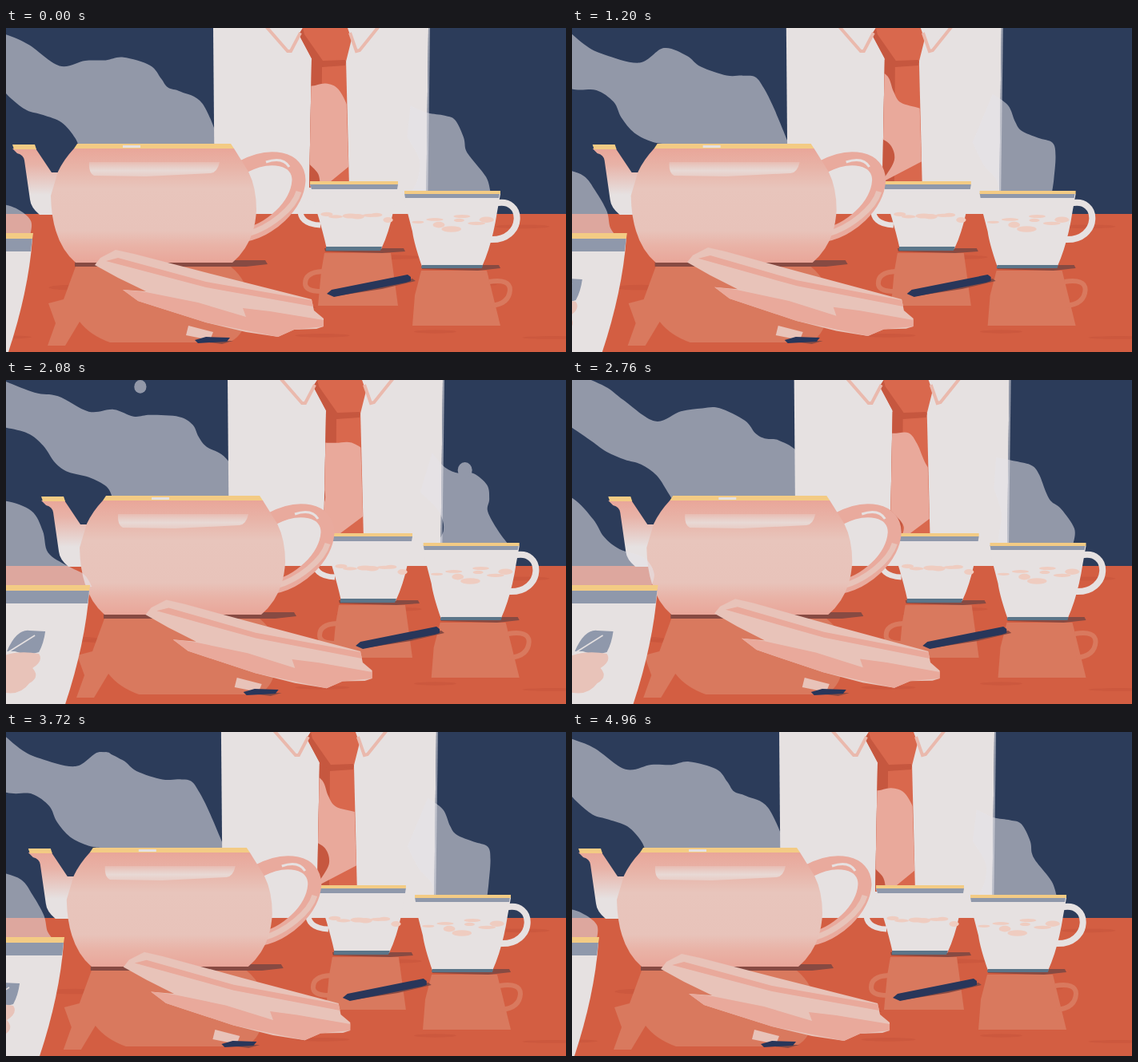
These frames come from a looping animation (700 by 406 pixels, 5000 ms). An HTML page:

```html
<!DOCTYPE html>
<html lang="en">
<head>
<meta charset="utf-8">
<title>Tea table</title>
<style>
  html, body { margin: 0; height: 100%; overflow: hidden; background: #2c3c5a; }
  svg { display: block; width: 100vw; height: 100vh; }
  .white { fill: #e6e1e1; }
  .gold { fill: #f3cb84; }
  .band { fill: #8f98ab; }
  .tie { fill: #d9684d; }
  .dark { fill: #c6573f; }
  .pink { fill: #e9a99b; }
  .cream { fill: #e8c3b9; }
  .petal { fill: #efccc0; }
  .ink { fill: #28365a; }
  .base { fill: #5b7589; }
  .shadow { fill: #874a42; }
  .mirror { fill: #d9795e; }
  .line { fill: none; }
  .steam { fill: #e6e4ea; opacity: .55; }
  .streak { fill: #c9563c; opacity: .7; }
</style>
</head>
<body>
<svg viewBox="0 0 700 406" preserveAspectRatio="none">
  <defs>
    <linearGradient id="pot" x2="0" y2="1">
      <stop offset="0" stop-color="#e9a699"/><stop offset=".16" stop-color="#e8b3a7"/>
      <stop offset=".35" stop-color="#e8c5bc"/><stop offset=".72" stop-color="#e8c3ba"/>
      <stop offset=".85" stop-color="#e9b3a7"/><stop offset="1" stop-color="#e9a699"/>
    </linearGradient>
    <linearGradient id="spout" x2="0" y2="1">
      <stop offset="0" stop-color="#e9a699"/><stop offset=".25" stop-color="#e8b3a8"/>
      <stop offset=".7" stop-color="#e6e1e1"/>
    </linearGradient>
    <linearGradient id="shine" x2="0" y2="1">
      <stop offset="0" stop-color="#e8d9d5" stop-opacity=".3"/>
      <stop offset=".6" stop-color="#e8d9d5"/><stop offset="1" stop-color="#e8d9d5" stop-opacity=".6"/>
    </linearGradient>
    <clipPath id="tieShape"><path d="M371 0H432V14L424 42 429 200H379L382 40 366 8Z"/></clipPath>
  </defs>

  <rect width="700" height="406" fill="#2c3c5a"/>
  <g data-shift="38" class="steam" id="potSteam"><path/></g>

  <g data-shift="19">
    <path class="white" d="M259 0H528L525 236H261Z"/>
    <path class="line" stroke="#959bab" stroke-width="2" d="M529 0L526 234"/>
    <path class="tie" d="M382 40H425L429 200H379Z"/>
    <path class="dark" d="M382 38L395 47 394 200H379ZM394 45L425 42 424 47 395 49Z"/>
    <path class="tie" d="M371 0H427L432 14 425 42 395 44 383 40 366 8Z"/>
    <path class="dark" d="M371 0L366 8 383 40 395 48 425 43 424 40 396 41 373 8Z"/>
    <path class="line" stroke="#eab9ad" stroke-width="4" d="M325-2L352 29H356L368 6M430 6L438 29 442 28 466-2"/>
  </g>
  <g data-shift="25" class="steam" id="cupSteam"><path/></g>
  <g data-shift="19" class="pink" clip-path="url(#tieShape)" id="tieSteam"><path/></g>

  <rect y="233" width="700" height="173" fill="#d35e42"/>
  <g id="table"></g>

  <g data-shift="19" id="farCup">
    <path class="mirror" d="M398 282H481L490 348H390L394 305Z"/>
    <path class="line" stroke="#d9795e" stroke-width="6" d="M396 305Q374 306 374 320 374 330 394 330"/>
    <path class="shadow" d="M398 276H497L499 280 470 282 399 280Z"/>
    <path class="line" stroke="#e6e1e1" stroke-width="7" d="M386 207C368 210 354 246 393 247"/>
    <path class="white" d="M380 196H490L488 207Q482 250 469 277H401Q395 250 386 222Z"/>
    <path class="band" d="M380 196H490L489 202H382Z"/>
    <path class="gold" d="M380 192H490V196H380Z"/>
    <path class="base" d="M400 274H470L468 279H400Z"/>
  </g>

  <g data-shift="25" id="rightCup">
    <path class="mirror" d="M519 304H601L618 373H508L511 335Z"/>
    <path class="line" stroke="#d9795e" stroke-width="6" d="M604 318Q630 314 630 328 629 346 606 348"/>
    <path class="shadow" d="M519 297H616L618 301 590 304 520 302Z"/>
    <path class="line" stroke="#e6e1e1" stroke-width="8" d="M611 220C649 210 649 268 604 265"/>
    <path class="white" d="M498 208H618L614 230Q608 270 595 299H520Q510 270 508 255L499 220Z"/>
    <path class="band" d="M498 207H617L616 213H499Z"/>
    <path class="gold" d="M498 204H618V208H498Z"/>
    <path class="base" d="M520 297H596L595 301H519Z"/>
  </g>

  <g data-shift="38">
    <path class="mirror" d="M87 299H281Q312 325 300 365 296 387 278 394H130Q105 385 92 368L74 398H52L62 370 53 345 72 340Z"/>
    <path class="shadow" d="M86 291H324L327 296 300 299H86Z"/>
    <path fill="url(#spout)" d="M8 151H37L57 181H66V234H42Q31 225 30 215L23 166Q22 159 14 157Z"/>
    <path class="line" stroke="#e9aa9d" stroke-width="17" d="M296 174C330 156 366 162 366 191 364 223 330 254 296 260"/>
    <path class="line" stroke="#e8c3b9" stroke-width="7" d="M366 205C360 226 330 250 302 258"/>
    <path class="line" stroke="#e6e1e1" stroke-width="3" d="M325 168Q346 161 354 174"/>
    <path fill="url(#pot)" d="M85 151H285L303 180Q313 200 313 228 311 270 283 294H87Q57 268 56 210L65 180Q72 165 85 151Z"/>
    <path fill="url(#shine)" d="M104 168H267Q264 181 256 182L175 186 110 185Q103 182 104 168Z"/>
    <path class="gold" d="M89 145H281L285 151H85ZM8 146H36L38 152H10Z"/>
    <path class="white" d="M146 147H168V150H146Z"/>
    <path class="shadow" d="M406 334L508 314 512 317 470 327 412 336Z"/>
    <path class="ink" d="M401 333L407 328 502 309 506 312 506 317 500 319 410 337Z"/>
  </g>

  <g data-shift="64">
    <g id="paper">
      <path class="cream" d="M111 297L118 288 137 278 160 283 260 309 382 340 385 354 397 364 397 374 388 377 360 378 340 387 300 381 250 369 190 350 165 342 146 328 175 330 140 313Z"/>
      <path class="pink" d="M146 328L175 331 240 344 300 362 296 351 330 355 397 366V374L360 378 340 387 250 369 165 342ZM125 292L250 325 384 349 382 341 250 318 140 288Z"/>
    </g>
    <path class="cream" d="M228 373L259 381 255 391 225 385Z"/>
    <path class="shadow" d="M238 392H284L270 396Z"/>
    <path class="ink" d="M236 391L250 387 280 388 276 393 240 395Z"/>
  </g>

  <g data-shift="75" class="steam" id="nearSteam"><path/></g>
  <g data-shift="75">
    <path class="white" d="M-160 264H33Q28 330 3 406H-160Z"/>
    <path class="band" d="M-160 263H33L31 280H-160Z"/>
    <path class="gold" d="M-160 257H34L33 264H-160Z"/>
    <path class="band" d="M-70 340Q-58 312-42 314L-22 315Q-24 330-30 341-45 346-60 340Z"/>
    <path class="line" stroke="#e6e1e1" stroke-width="1.5" d="M-70 342L-35 320"/>
    <path class="cream" d="M-80 348Q-60 338-30 343-24 352-38 361-28 372-42 380-55 398-80 390Z"/>
  </g>
</svg>
<script>
const LOOP = 5000, PUFF = LOOP / 2, STEP = .2;
const byId = id => document.getElementById(id);
const mix = (a, b, k) => a + (b - a) * k;

function ellipse(parent, attrs) {
  const node = document.createElementNS("http://www.w3.org/2000/svg", "ellipse");
  setAttrs(node, attrs);
  return parent.appendChild(node);
}
function setAttrs(node, attrs) {
  for (const name in attrs) node.setAttribute(name, attrs[name]);
}

let seed = 7;
const random = () => (seed = seed * 16807 % 2147483647) / 2147483647;

function scatter(id, cls, count, [x0, x1], [y0, y1], size) {
  for (let i = 0; i < count; i++) ellipse(byId(id), {
    class: cls, cx: mix(x0, x1, (i + random()) / count), cy: mix(y0, y1, random()),
    rx: size * mix(.5, 1, random()), ry: mix(1.5, 4, random())
  });
}
scatter("table", "streak", 14, [0, 700], [240, 400], 50);
scatter("farCup", "petal", 7, [396, 480], [230, 242], 11);
scatter("rightCup", "petal", 8, [514, 602], [236, 254], 13);

// A plume has two edges, each listed from its foot upwards; a wave runs along them.
const edge = (start, points) => ({ start, points: points.split(" ").map(p => p.split(",").map(Number)) });
const plumes = [
  { id: "potSteam", amp: 8,
    outer: edge(-1.1, "262,148 240,98 220,78 207,68 195,61 178,53 145,43 125,38 98,33 67,45 26,27 0,15 -40,-8"),
    inner: edge(-.4, "97,150 85,140 65,125 45,111 30,98 10,83 -12,74 -45,62") },
  { id: "cupSteam", amp: 9,
    outer: edge(-1.05, "597,206 595,188 587,162 582,148 572,137 556,122 545,114 530,102 510,90"),
    inner: edge(.5, "514,210 517,190 510,168 495,140") },
  { id: "tieSteam", amp: 11,
    outer: edge(-.65, "460,150 446,118 428,100 409,85 396,75 382,67 362,56"),
    inner: edge(0, "382,200 387,183 385,165 380,148 368,130") },
  { id: "nearSteam", amp: 10,
    outer: edge(-.2, "27,262 22,246 10,228 -12,210 -26,190 -45,172 -75,156 -105,148"),
    inner: edge(0, "-150,262 -150,150") }
];

// Loose drops: plume, middle of life, place and radius.
const drops = [
  ["potSteam", 1840, 142, 25, 9], ["potSteam", 3320, 180, 8, 11], ["potSteam", 4080, 90, 11, 16],
  ["cupSteam", 2080, 550, 113, 9], ["tieSteam", 4080, 430, 8, 8], ["nearSteam", 3320, -38, 196, 14]
].map(([id, at, x, y, r]) => ({ node: ellipse(byId(id), {}), at, x, y, r }));

const layers = document.querySelectorAll("[data-shift]");

// Cubic bezier (.45, 0, .55, 1), solved by bisection.
function ease(u) {
  let lo = 0, hi = 1, s;
  for (let i = 0; i < 20; i++) {
    s = (lo + hi) / 2;
    const x = 1.35 * s * (1 - s) ** 2 + 1.65 * s * s * (1 - s) + s ** 3;
    if (x < u) lo = s; else hi = s;
  }
  return s * s * (3 - 2 * s);
}

const near = (list, i) => list[Math.max(0, Math.min(list.length - 1, i))];

function ripple({ start, points }, amp, phase) {
  return points.map(([x, y], i) => {
    const [ax, ay] = near(points, i - 1), [bx, by] = near(points, i + 1);
    const push = amp * Math.cos(2 * Math.PI * (phase - start - STEP * i)) / Math.hypot(bx - ax, by - ay);
    return [x - (by - ay) * push, y + (bx - ax) * push];
  });
}

function spline(pts) {
  const handle = (i, sign) => [0, 1].map(k =>
    pts[i][k] + sign * (near(pts, i + 1)[k] - near(pts, i - 1)[k]) / 6);
  return pts[0] + pts.slice(1).map((p, i) => `C${handle(i, 1)} ${handle(i + 1, -1)} ${p}`).join("");
}

function draw(now) {
  const t = now % LOOP;
  const sway = ease(1 - Math.abs(1 - t / PUFF));
  for (const g of layers) g.setAttribute("transform", `translate(${g.dataset.shift * sway} 0)`);

  for (const { id, amp, outer, inner } of plumes) {
    const [a, b] = [outer, inner].map(e => ripple(e, amp, t / PUFF));
    byId(id).firstChild.setAttribute("d", `M${spline(a)}L${spline(b.reverse())}Z`);
  }

  for (const { node, at, x, y, r } of drops) {
    const age = (t - at) / 450, size = r * Math.sqrt(Math.max(0, 1 - age * age));
    setAttrs(node, { cx: x - 19 * age, cy: y - 31 * age, rx: size, ry: size * 1.1 });
  }

  const lift = Math.sin(3 * Math.PI * t / LOOP) ** 2;
  byId("paper").setAttribute("transform",
    `translate(390 365) rotate(${1.4 * lift}) scale(${1 - .0135 * lift}) translate(-390 -365)`);
  requestAnimationFrame(draw);
}
requestAnimationFrame(draw);
</script>
</body>
</html>
```
